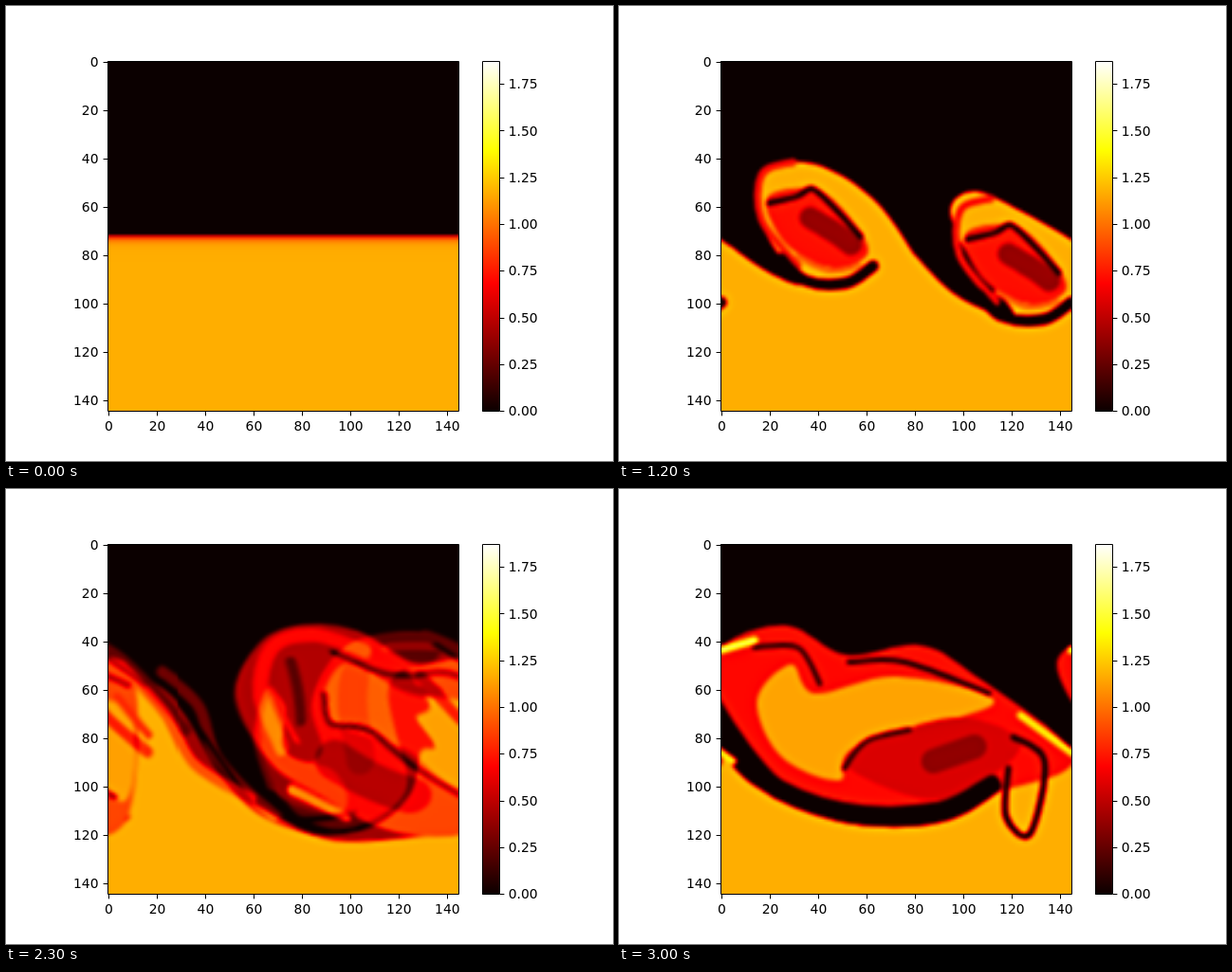
Recreate the animation shown at these times as an HTML page with a canvas. Size 640 px wide and 480 px high, loop 3.1 s.

```html
<!DOCTYPE html>
<html lang="en">
<head>
<meta charset="utf-8">
<title>Shear layer roll-up</title>
<style>
  html, body { margin: 0; width: 100%; height: 100%; overflow: hidden; background: #fff; }
  canvas, svg { position: absolute; left: 0; top: 0; width: 640px; height: 480px; }
  text { font: 13.89px "DejaVu Sans", sans-serif; }
  path { stroke: #000; fill: none; }
</style>
</head>
<body>
<canvas id="view" width="640" height="480"></canvas>
<svg id="axes" viewBox="0 0 640 480">
  <defs>
    <linearGradient id="hot" x1="0" y1="1" x2="0" y2="0">
      <stop offset="0" stop-color="#0b0000"/>
      <stop offset=".365" stop-color="#f00"/>
      <stop offset=".746" stop-color="#ff0"/>
      <stop offset="1" stop-color="#fff"/>
    </linearGradient>
  </defs>
  <rect x="502" y="58" width="18.5" height="369.5" fill="url(#hot)"/>
  <path d="M107.5 58.5H477.5V427.5H107.5ZM502.5 58.5H520.5V427.5H502.5Z"/>
</svg>
<script>
const N = 145, VMAX = 1.874, STEP = 100, FRAMES = 31;
const LEFT = 107.2, TOP = 57.6, SIZE = 369.6;

const clamp = (v, lo, hi) => Math.min(hi, Math.max(lo, v));
const mod = v => ((v % N) + N) % N;
const grid = rule => Float32Array.from({ length: N * N }, (_, i) => rule(i % N, Math.floor(i / N), i));

// Shapes: density in hundredths, then points "x,y x,y ..." in grid cells.
const shape = (kind, value, path, width = 0) =>
  ({ kind, value, width, pts: path.split(' ').map(p => p.split(',').map(Number)) });
const floor = path => shape('floor', 117, path);
const blob = (value, path) => shape('blob', value, path);
const line = (value, width, path) => shape('line', value, path, width);
const shift = (shapes, dx, dy) =>
  shapes.map(s => ({ ...s, pts: s.pts.map(([x, y]) => [x + dx, y + dy]) }));

const eddy = [
  line(70, 3, '32,85 17,66 17,47 30,42'),
  line(0, 4.5, '25,82 35,91 52,92 63,85'),
  blob(72, '19,57 38,53 51,62 61,79 47,86 27,76'),
  line(40, 9, '37,65 47,71 54,76'),
  line(5, 2.2, '20,59 32,56 38,53 47,61 58,73'),
  line(92, 2, '32,81 45,87 58,85')
];
const pair = [
  floor('80,80 96,96 112,104 121,104 104,83 95,62 105,54 124,62 145,74 164,87 178,92 165,74 159.5,54 171,42.5 190,45 210,59 225,80'),
  ...eddy, ...shift(eddy, 82, 15)
];

const merging = [
  floor('57,73 75,98 92,107 118,108 145,107 157,107 159,90 171,75 188,84 195,74 202,73'),
  blob(72, '107,66 116,47 136,44 140,50 167,47 186,57 193,78 170,74 114,77'),
  blob(103, '108,64 118,47 136,46 132,60 140,76 114,74'),
  line(38, 8, '148,66 165,62'),
  line(0, 2.5, '110,79 145,80 172,74 189,82'),
  line(22, 4, '115,62 117,66'),
  blob(64, '85,88 115,83 150,81 139,95 104,105 84,97'),
  line(40, 7, '96,97 126,92'),
  blob(116, '65,58 71,58 78,75 92,96 82,97 70,76'),
  line(0, 3.5, '72,87 83,102 107,106 130,99 149,100'),
  blob(45, '144,84 158,86 157,101 146,102')
];

const folding = [
  floor('54,92 69,109 90,118 112,118 129,108 136,93 143,90 138,79 144,72 134,47 145,41 165,54 183,66 199,92'),
  blob(64, '87,87 97,80 99,60 116,41 147,39 147,52 132,60 128,84 126,108 100,117 80,104'),
  line(40, 12, '118,55 110,90'),
  line(0, 5, '147,66 136,70 130,93'),
  line(108, 4, '130,45 148,45'),
  blob(106, '72,82 77,57 86,62 82,79 98,90 100,109 78,101'),
  line(70, 2.5, '74,96 71,75 80,56 88,75'),
  line(0, 2.5, '66,101 80,110 104,111'),
  line(65, 5, '-2,40 15,49 41,76'),
  line(0, 2, '2,44 25,60'),
  line(75, 5, '32,54 47,66 54,86 75,109'),
  line(0, 2, '32,58 47,75 66,103'),
  line(15, 5, '-3,60 10,77 25,88')
];

const overturn = [
  floor('21,78 34,96 55,109 83,122 108,122 147,114 141,100 140,60 153,58 166,78'),
  blob(72, '46,66 55,43 72,34.5 94,36 117,47 148,51 148,112 122,119 90,108 63,95'),
  blob(111, '80,64 89,50 113,58 147,67 147,105 120,82 98,78 84,77'),
  line(40, 16, '90,91 122,101'),
  line(106, 6, '67,89 56,66 60,45 76,39 96,44'),
  line(36, 4, '67,51 73,78'),
  line(4, 2, '80,65 85,77 105,77 143,103'),
  line(4, 2, '83,46 104,52 131,51 147,57'),
  line(0, 4, '43,91 75,107 99,121'),
  line(104, 4, '73,105 97,113'),
  line(75, 4, '2,52 18,70 30,92 55,108'),
  line(60, 3, '-3,61 11,78')
];

const billow = [
  floor('22,105 55,116 92,115 116,100 128,73 146,87 167,105'),
  blob(70, '-5,55 4,40 28,34 52,46 82,42 103,53 146,88 112,103 58,110 25,98'),
  blob(114, '15,65 29,50 39,62 73,55 113,66 56,84 49,98 25,88'),
  blob(58, '52,92 68,80 100,72 124,84 92,106'),
  line(38, 10, '88,90 105,84'),
  line(12, 2, '51,93 60,82 78,77'),
  line(145, 3, '0,44 14,40'),
  line(10, 2, '14,43 32,43 41,58'),
  line(5, 2, '53,49 76,49 111,62'),
  line(0, 8, '-4,73 15,96 50,111 90,111 112,100'),
  line(130, 3, '124,71 150,90'),
  line(6, 2.4, '121,80 134,90 128,120 118,113 119,93')
];

// Flow between poses, centres given at its end.
const flow = (drift, turn, radius, power, ...centres) => ({ drift, turn, radius, power, centres });
const flows = [
  flow(-24, 4.67, 21, 2, [63, 71], [138, 77]),
  flow(-16, 0.9, 22, 1, [42, 68], [124, 81]),
  flow(-24, 0.5, 38, 1, [131, 79]),
  flow(-22, 0.7, 38, 1, [110, 80]),
  flow(-15, 0.7, 38, 1, [95, 80]),
  flow(-25, 0.5, 38, 1, [70, 80])
];

function makeCanvas() {
  const c = document.createElement('canvas');
  c.width = c.height = N;
  return c;
}

function trace(g, pts, closed) {
  const n = pts.length;
  const at = i => pts[closed ? (i + n) % n : clamp(i, 0, n - 1)];
  g.beginPath();
  g.moveTo(...pts[0]);
  for (let i = 0; i < (closed ? n : n - 1); i++) {
    const a = at(i - 1), b = at(i), c = at(i + 1), d = at(i + 2);
    g.bezierCurveTo(b[0] + (c[0] - a[0]) / 6, b[1] + (c[1] - a[1]) / 6,
      c[0] - (d[0] - b[0]) / 6, c[1] - (d[1] - b[1]) / 6, ...c);
  }
}

function blur(f, passes) {
  for (let p = 0; p < passes; p++) {
    const src = f;
    const row = grid((x, y, i) => (src[y * N + mod(x - 1)] + 2 * src[i] + src[y * N + mod(x + 1)]) / 4);
    f = grid((x, y, i) =>
      (row[Math.max(0, y - 1) * N + x] + 2 * row[i] + row[Math.min(N - 1, y + 1) * N + x]) / 4);
  }
  return f;
}

// Diffuse, then overshoot beside steep fronts.
function finish(f) {
  const soft = blur(f, 1), wide = blur(soft, 7);
  return soft.map((v, i) => Math.max(0, v + 0.3 * (v - wide[i])));
}

function paint(shapes) {
  const g = makeCanvas().getContext('2d', { willReadFrequently: true });
  g.fillRect(0, 0, N, N);
  g.lineCap = g.lineJoin = 'round';
  for (const { kind, value, width, pts } of shapes) {
    g.fillStyle = g.strokeStyle = `rgb(${value},${value},${value})`;
    g.lineWidth = width;
    for (const dx of [-N, 0, N]) {
      g.setTransform(1, 0, 0, 1, dx, 0);
      trace(g, pts, kind === 'blob');
      if (kind === 'line') { g.stroke(); continue; }
      if (kind === 'floor') {
        g.lineTo(pts[pts.length - 1][0], 200);
        g.lineTo(pts[0][0], 200);
      }
      g.fill();
    }
  }
  const px = g.getImageData(0, 0, N, N).data;
  return finish(grid((x, y, i) => px[i * 4] / 100));
}

function sample(f, x, y) {
  x = mod(x);
  y = clamp(y, 0, N - 1);
  const i = Math.floor(x) % N, j = Math.floor(y), u = x - Math.floor(x), v = y - j;
  const k = (i + 1) % N, r = j * N, s = Math.min(N - 1, j + 1) * N;
  return (f[r + i] * (1 - u) + f[r + k] * u) * (1 - v) + (f[s + i] * (1 - u) + f[s + k] * u) * v;
}

// Side 0 runs a pose forward along the flow, side 1 runs it back.
function carry(f, { drift, turn, radius, power, centres }, u, side) {
  const angle = turn * (u ** power - side);
  return grid((x, y) => {
    let qx = x - drift * (u - side), qy = y;
    for (const [cx, cy] of centres) {
      const dx = mod(x - cx + drift * (1 - u) + N / 2) - N / 2, dy = y - cy;
      const a = angle * Math.exp(-(dx * dx + dy * dy) / radius ** 2);
      const c = Math.cos(a) - 1, s = Math.sin(a);
      qx += c * dx - s * dy;
      qy += s * dx + c * dy;
    }
    return sample(f, qx, qy);
  });
}

// Wind the flat layer up and mix the eddy cores.
function windUp(f, stream) {
  const wound = finish(carry(f, stream, 1, 0)), mixed = blur(wound, 6);
  return grid((x, y, i) => {
    const core = stream.centres.reduce((sum, [cx, cy]) => {
      const dx = mod(x - cx + N / 2) - N / 2, dy = y - cy;
      return sum + Math.exp(-(dx * dx + dy * dy) / 200);
    }, 0);
    return wound[i] + (0.8 * mixed[i] - wound[i]) * 0.5 * Math.min(1, core);
  });
}

function colour(f) {
  const c = makeCanvas(), g = c.getContext('2d'), img = g.createImageData(N, N);
  f.forEach((v, i) => {
    const n = v / VMAX;
    img.data[i * 4] = 255 * (0.0416 + 0.9584 * clamp(n / 0.365, 0, 1));
    img.data[i * 4 + 1] = 255 * clamp((n - 0.365) / 0.381, 0, 1);
    img.data[i * 4 + 2] = 255 * clamp((n - 0.746) / 0.254, 0, 1);
    img.data[i * 4 + 3] = 255;
  });
  g.putImageData(img, 0, 0);
  return c;
}

const flat = grid((x, y) => y < 72 ? 0 : 1.17 - 0.67 * Math.exp((72 - y) * 0.75));
const key = (time, field) => ({ time, field });
const keys = [
  key(0, flat),
  key(800, windUp(flat, flows[0])),
  key(1200, paint(pair)),
  key(1600, paint(merging)),
  key(2000, paint(folding)),
  key(2500, paint(overturn)),
  key(3000, paint(billow))
];

function fieldAt(t) {
  const i = Math.max(0, keys.findIndex(k => k.time >= t) - 1);
  const a = keys[i], b = keys[i + 1], u = (t - a.time) / (b.time - a.time);
  const w = u * u * (3 - 2 * u);
  const from = carry(a.field, flows[i], u, 0), to = carry(b.field, flows[i], u, 1);
  return from.map((v, j) => v + (to[j] - v) * w);
}

const frames = Array.from({ length: FRAMES }, (_, i) => colour(fieldAt(i * STEP)));

function buildAxes() {
  const svg = document.getElementById('axes');
  const add = (tag, attrs, text = '') => {
    const el = document.createElementNS(svg.namespaceURI, tag);
    for (const k in attrs) el.setAttribute(k, attrs[k]);
    el.textContent = text;
    svg.append(el);
  };
  const snap = v => Math.round(v) + 0.5;
  const label = (x, y, anchor, text) => add('text', { x, y, 'text-anchor': anchor }, text);
  for (let v = 0; v <= 140; v += 20) {
    const d = (v + 0.5) * SIZE / N, x = LEFT + d, y = TOP + d;
    add('path', { d: `M${snap(x)} 428v4.4M102.6 ${snap(y)}h4.4` });
    label(x, 447.7, 'middle', v);
    label(97.5, y + 5.2, 'end', v);
  }
  for (let v = 0; v < VMAX; v += 0.25) {
    const y = TOP + SIZE * (1 - v / VMAX);
    add('path', { d: `M521 ${snap(y)}h4.4` });
    label(529.8, y + 5.2, 'start', v.toFixed(2));
  }
}
buildAxes();

const view = document.getElementById('view').getContext('2d');
const start = performance.now();
let shown = -1;
function tick() {
  const i = Math.floor((performance.now() - start) / STEP) % FRAMES;
  if (i !== shown) view.drawImage(frames[shown = i], LEFT, TOP, SIZE, SIZE);
  requestAnimationFrame(tick);
}
tick();
</script>
</body>
</html>
```
